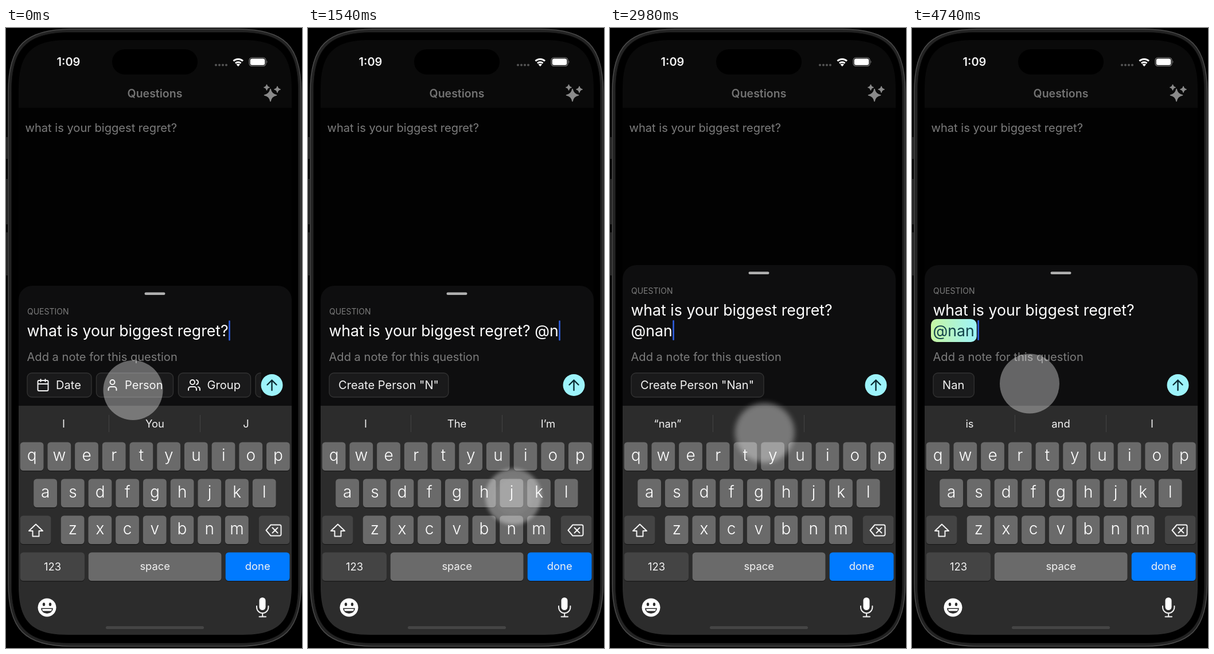
Recreate the animation shown at these times as an HTML page. Size 516 by 1080 pixels, loop 4.84 s.

```html
<!DOCTYPE html>
<html lang="en">
<head>
<meta charset="utf-8">
<title>Questions</title>
<style>
  html, body { margin: 0; width: 100%; height: 100%; overflow: hidden; background: #000; }
  svg { display: block; width: 100%; height: 100%; }
  text { font: 20.1px Inter, "Open Sans", sans-serif; fill: #f2f2f2; white-space: pre; }
  .mid { text-anchor: middle; }
  .grey { fill: #7c7c7c; }
  .title { font-size: 26.7px; fill: #fff; }
  .small { font-size: 18.4px; }
  .key { font-size: 28px; font-weight: 300; fill: #fff; }
  .chip { fill: #1a1a1b; stroke: #333; stroke-width: 1.3; }
  .line { fill: none; stroke: #f2f2f2; stroke-width: 2; stroke-linecap: round; stroke-linejoin: round; }
</style>
</head>
<body>
<svg viewBox="0 0 516 1080">
  <defs>
    <clipPath id="screen"><path id="display"/></clipPath>
    <clipPath id="row"><rect x="30" y="590" width="414.5" height="64"/></clipPath>
    <linearGradient id="tint">
      <stop offset="0" stop-color="#c6f6a2"/><stop offset="1" stop-color="#9df3fa"/>
    </linearGradient>
  </defs>

  <!-- phone body -->
  <g fill="#232323">
    <rect y="190" width="3" height="38"/><rect y="263" width="3" height="79"/><rect y="356" width="3" height="75"/>
  </g>
  <path id="body" fill="#232323" stroke="#4a4a4a" stroke-width="1.5"/>
  <path id="bezel" stroke="#111"/>

  <g clip-path="url(#screen)">
    <rect x="22" y="21" width="476" height="1036" fill="#020202"/>
    <rect x="22" y="21" width="476" height="118" fill="#0a0a0a"/>
    <rect x="185" y="37" width="149" height="44" rx="22"/>
    <text class="mid" x="109" y="66.3" style="font-size:20px;font-weight:600">1:09</text>
    <g fill="#555">
      <circle cx="366" cy="64.5" r="2"/><circle cx="372" cy="64.5" r="2"/><circle cx="378" cy="64.5" r="2"/><circle cx="384" cy="64.5" r="2"/>
    </g>
    <path d="M396.5 57.5a12 12 0 0 1 16.5 0M400 61.3a7 7 0 0 1 9.5 0" fill="none" stroke="#fff" stroke-width="3"/>
    <path d="M401.6 63.5a4.5 4.5 0 0 1 6.4 0l-3.2 3.4z" fill="#fff"/>
    <rect x="424" y="51.5" width="29" height="15" rx="5" fill="none" stroke="#777" stroke-width="1.2"/>
    <rect x="425.7" y="53.2" width="25.6" height="11.6" rx="3.5" fill="#fff"/>
    <path d="M454.5 56.5q2 2.5 0 5z" fill="#777"/>
    <text class="mid" x="259.5" y="120.5" style="font-size:19.5px;font-weight:600;fill:#727272">Questions</text>
    <g id="stars" fill="#8a8a8a" stroke="#8a8a8a" stroke-width="1.6" stroke-linejoin="round"></g>
    <text class="grey" x="33.5" y="181">what is your biggest regret?</text>

    <!-- sheet -->
    <g id="sheet">
      <rect x="22" y="449" width="476" height="300" rx="24" fill="#0e0e0f"/>
      <rect x="241.5" y="460.5" width="36" height="4.6" rx="2.3" fill="#b0b0b0"/>
      <text class="grey" x="37" y="498.5" style="font-size:14px">QUESTION</text>
      <text class="title" id="line1" x="36.5" y="537"></text>
      <rect id="pill" x="33" y="543" height="40" rx="10" fill="url(#tint)"/>
      <text class="title" id="line2" x="36.5" y="573"></text>
      <rect id="caret" width="2.6" height="35" rx="1" fill="#2f5fe0"/>
      <g id="lower">
        <text class="grey" x="36.5" y="580">Add a note for this question</text>
        <g id="tools" clip-path="url(#row)">
          <rect class="chip" x="37" y="601" width="112" height="42" rx="8"/>
          <rect class="chip" x="157.5" y="601" width="134" height="42" rx="8"/>
          <rect class="chip" x="300.5" y="601" width="126" height="42" rx="8"/>
          <rect class="chip" x="435" y="601" width="90" height="42" rx="8"/>
          <g class="line">
            <path transform="translate(52.5 610)" d="M5 4h14a2 2 0 0 1 2 2v14a2 2 0 0 1-2 2H5a2 2 0 0 1-2-2V6a2 2 0 0 1 2-2zM8 2v4M16 2v4M3 10h18"/>
            <path transform="translate(173.5 610)" d="M19 21v-2a4 4 0 0 0-4-4H9a4 4 0 0 0-4 4v2M8 7a4 4 0 1 0 8 0a4 4 0 1 0-8 0"/>
            <path transform="translate(316 610)" d="M16 21v-2a4 4 0 0 0-4-4H6a4 4 0 0 0-4 4v2M5 7a4 4 0 1 0 8 0a4 4 0 1 0-8 0M22 21v-2a4 4 0 0 0-3-3.87M16 3.13a4 4 0 0 1 0 7.75"/>
          </g>
          <text x="87" y="629">Date</text><text x="207" y="629">Person</text><text x="350.5" y="629">Group</text>
        </g>
        <g id="offer">
          <rect class="chip" id="offerBox" x="37" y="601" height="42" rx="8"/>
          <text id="offerText" x="53" y="629"></text>
        </g>
        <circle cx="463.5" cy="622" r="19" fill="#9df3fb"/>
        <path class="line" d="M463.5 631v-17.5M455.5 621.5l8-8l8 8" style="stroke:#0c2c33;stroke-width:2.4"/>
      </g>
    </g>

    <!-- keyboard -->
    <rect x="22" y="658" width="476" height="400" fill="#2c2c2c"/>
    <path d="M179.5 674v30M338.5 674v30" stroke="#434343"/>
    <g id="hints"></g>
    <g id="keys"></g>
    <path class="line" d="M52 864.5l12 11.5h-6.5v9.5h-11v-9.5H40z"/>
    <path class="line" d="M461.5 865.5h15.5a2.5 2.5 0 0 1 2.5 2.5v14a2.5 2.5 0 0 1-2.5 2.5h-15.5l-8-9.5zM464.5 870.5l9 9M473.5 870.5l-9 9"/>
    <circle cx="71.5" cy="1009.5" r="16" fill="#fff"/>
    <g fill="#2c2c2c">
      <ellipse cx="66" cy="1004" rx="2.2" ry="3"/><ellipse cx="77" cy="1004" rx="2.2" ry="3"/>
      <path d="M61 1010.5h21a10.5 9.5 0 0 1-21 0z"/>
    </g>
    <path d="M63 1012h17l-1 3.5h-15z" fill="#fff"/>
    <rect x="441.5" y="992" width="11" height="22" rx="5.5" fill="#fff"/>
    <path class="line" d="M437 1007v2a10.2 10.2 0 0 0 20.4 0v-2M447.2 1019.5v6M441.5 1025.500h11.5"/>
    <rect x="174" y="1042" width="171" height="5" rx="2.5" fill="#454545"/>
  </g>

  <g id="touch" fill="#fff">
    <circle id="disc" fill-opacity=".36"/>
    <circle id="glow" fill-opacity=".16"/>
  </g>
</svg>
<script>
const LOOP = 4840, REST = 52;
const $ = id => document.getElementById(id);
const set = (el, attrs) => { for (const k in attrs) el.setAttribute(k, attrs[k]); };
const clamp = v => Math.max(0, Math.min(1, v));
const ramp = (t, start, length) => clamp((t - start) / length);
const easeOut = (p, n) => 1 - (1 - p) ** n;
const easeInOut = p => p < .5 ? 4 * p ** 3 : 1 - 4 * (1 - p) ** 3;
const latest = (list, t) => list.filter(s => s[0] <= t).pop();

// time, tail of line one, line two, chip label
const WRAP = 2280, PICKED = 4400;
const edits = [
  [0, '', '', null],
  [720, ' @', '', ''],
  [1460, ' @n', '', 'Create Person "N"'],
  [1870, ' @na', '', 'Create Person "Na"'],
  [WRAP, '', '@nan', 'Create Person "Nan"'],
  [PICKED, '', '@nan', 'Nan']
];
const hints = [
  [0, 'I', 'You', 'J'], [800, 'I', 'The', 'I’m'], [1620, '“n”', '', ''],
  [1960, '“na”', '', ''], [2440, '“nan”', '', ''], [4460, 'is', 'and', 'I']
];
// time, x, y of the finger
const path = [
  [0, 221.5, 631], [400, 222, 623], [1090, 222, 623], [1840, 404, 882], [2080, 424, 775],
  [2320, 415, 867], [2640, 406, 884], [3240, 205, 620], [LOOP, 205, 619.5]
];
// press, release
const taps = [[340, 670], [1340, 1460], [1750, 1870], [2160, 2280], [3990, 4320]];

// rounded box with smooth, continuous corners
function softBox(x, y, w, h, r) {
  const e = r * 1.3, k = r * .348, R = x + w, B = y + h;
  return `M${x + e} ${y}H${R - e}C${R - k} ${y} ${R} ${y + k} ${R} ${y + e}` +
    `V${B - e}C${R} ${B - k} ${R - k} ${B} ${R - e} ${B}` +
    `H${x + e}C${x + k} ${B} ${x} ${B - k} ${x} ${B - e}` +
    `V${y + e}C${x} ${y + k} ${x + k} ${y} ${x + e} ${y}z`;
}
set($('body'), { d: softBox(4, 2, 510.5, 1075, 84) });
set($('bezel'), { d: softBox(9.5, 7.5, 500, 1064, 79) });
set($('display'), { d: softBox(22, 21, 476, 1036, 66) });

function star(x, y, r) {
  const q = r * .15;
  return `<path d="M${x} ${y - r}Q${x + q} ${y - q} ${x + r} ${y}Q${x + q} ${y + q} ${x} ${y + r}` +
    `Q${x - q} ${y + q} ${x - r} ${y}Q${x - q} ${y - q} ${x} ${y - r}z"/>`;
}
$('stars').innerHTML = star(461, 117, 10.5) + star(473, 107, 5) + star(454.5, 103.5, 4.5);

function key(x, y, w, label, fill = '#6a6a6a', cls = 'small', base = 30) {
  const box = `x="${x - .3}" width="${w + .3}" height="49.5" rx="5.5"`;
  return `<rect ${box} y="${y + .8}" fill="#191919"/><rect ${box} y="${y - .5}" fill="${fill}"/>` +
    `<text class="mid ${cls}" x="${x + w / 2}" y="${y + base}">${label}</text>`;
}
const letters = (row, x, y) =>
  [...row].map((c, i) => key(x + 47.7 * i, y, 40.5, c, '#6a6a6a', 'key', 31.5)).join('');
$('keys').innerHTML =
  letters('qwertyuiop', 25, 722) + letters('asdfghjkl', 48.5, 786) + letters('zxcvbnm', 96, 850) +
  key(25, 850, 53.5, '', '#444') + key(441, 850, 53.5, '', '#444') +
  key(25, 914, 112, '123', '#444', 'small', 31) + key(144, 914, 231.5, 'space') +
  key(383, 914, 111.5, 'done', '#007aff');
$('hints').innerHTML = [100.5, 259.5, 418.5].map(x => `<text class="mid small" x="${x}" y="696"></text>`).join('');
const hintTexts = [...$('hints').children];

function finger(t) {
  t = Math.max(0, Math.min(LOOP - 1, t));
  const i = path.findIndex(p => p[0] > t), [t0, x0, y0] = path[i - 1], [t1, x1, y1] = path[i];
  const p = easeInOut((t - t0) / (t1 - t0));
  return [x0 + (x1 - x0) * p, y0 + (y1 - y0) * p];
}

function drawTouch(t) {
  const [x, y] = finger(t), [ax, ay] = finger(t - 10), [bx, by] = finger(t + 10);
  const tap = latest(taps, t);
  let r = REST, inner = 0, shine = 0;
  if (tap) {
    const back = easeOut(ramp(t, tap[1], 200), 2);
    r *= 1 - .17 * easeOut(ramp(t, tap[0], 140), 2) * (1 - back);
    inner = r * ramp(t, tap[0], 300);
    shine = 1 - back;
  }
  set($('disc'), { cx: x, cy: y, r });
  set($('glow'), { cx: x, cy: y, r: inner, opacity: shine });
  const blur = Math.min(6, Math.hypot(bx - ax, by - ay) * .2);
  $('touch').style.filter = blur > .3 ? `blur(${blur}px)` : 'none';
}

function caretAlpha(t) {
  if (t > 720 && t < 2900 || t > PICKED) return 1;
  const p = t % 1000;
  return 1 - ramp(p, 340, 120) + ramp(p, 740, 120);
}

function draw(t) {
  const [, tail, second, label] = latest(edits, t);
  const wrapped = second !== '', picked = t >= PICKED;
  $('line1').textContent = 'what is your biggest regret?' + tail;
  $('line2').textContent = second;
  const end = 36.5 + $(wrapped ? 'line2' : 'line1').getComputedTextLength();
  $('line2').style.fill = picked ? '#12424a' : '#fff';
  set($('pill'), { width: end - 29, opacity: picked ? 1 : 0 });
  set($('caret'), { x: end + (picked ? 5.5 : .5), y: wrapped ? 545 : 509.5, opacity: caretAlpha(t) });

  const rise = wrapped ? 36 * easeOut(ramp(t, WRAP, 270), 3) : 0;
  set($('sheet'), { transform: `translate(0 ${-rise})` });
  set($('lower'), { transform: `translate(0 ${wrapped ? 36 : 0})` });

  $('tools').style.display = label === null ? '' : 'none';
  $('offer').style.display = label ? '' : 'none';
  if (label) {
    $('offerText').textContent = label;
    set($('offerBox'), { width: $('offerText').getComputedTextLength() + 33 });
  }
  const words = latest(hints, t);
  hintTexts.forEach((el, i) => el.textContent = words[i + 1]);
  drawTouch(t);
}

const start = performance.now();
function frame() {
  draw((performance.now() - start) % LOOP);
  requestAnimationFrame(frame);
}
frame();
</script>
</body>
</html>
```
